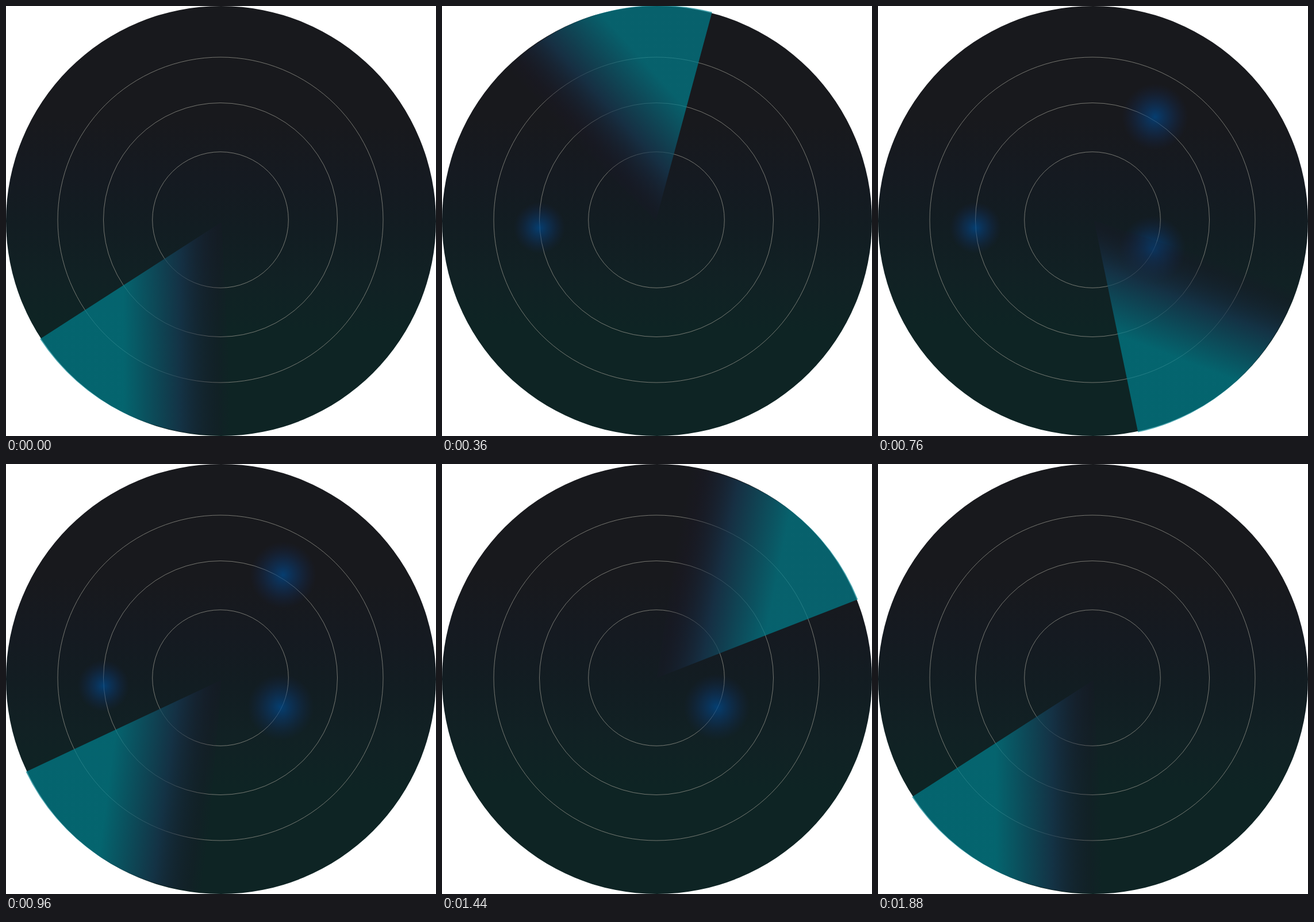
Recreate the animation shown at these times as an HTML page. Size 748 px wide and 748 px high, loop 1.92 s.

```html
<!DOCTYPE html>
<html lang="en">
<head>
<meta charset="utf-8">
<title>Radar sweep</title>
<style>
  html, body { margin: 0; width: 100%; height: 100%; overflow: hidden; background: #fff; }
  svg { display: block; width: 100vw; height: 100vh; }
</style>
</head>
<body>
<svg viewBox="0 0 748 748">
  <defs>
    <linearGradient id="dish" gradientUnits="userSpaceOnUse" x1="374" y1="0" x2="359" y2="748">
      <stop offset=".27" stop-color="#18191d"/>
      <stop offset=".4" stop-color="#151a21"/>
      <stop offset=".52" stop-color="#121d22"/>
      <stop offset=".63" stop-color="#112124"/>
      <stop offset=".75" stop-color="#0e2424"/>
    </linearGradient>
    <!-- Runs 33 degrees ahead of the leading edge -->
    <linearGradient id="beam" gradientUnits="userSpaceOnUse" x1="-15" y1="0" x2="170" y2="0" gradientTransform="rotate(33)">
      <stop offset="0" stop-color="#1a182a" stop-opacity="0"/>
      <stop offset=".11" stop-color="#1a182a" stop-opacity=".25"/>
      <stop offset=".46" stop-color="#163852" stop-opacity=".7"/>
      <stop offset="1" stop-color="#00808e" stop-opacity=".7"/>
    </linearGradient>
    <radialGradient id="glow">
      <stop offset="0" stop-color="#004a8c" stop-opacity=".75"/>
      <stop offset=".5" stop-color="#0a3c78" stop-opacity=".38"/>
      <stop offset="1" stop-color="#14285a" stop-opacity="0"/>
    </radialGradient>
  </defs>
  <circle cx="374" cy="374" r="374" fill="url(#dish)"/>
  <g id="rings" fill="none" stroke="#8f8e86" stroke-width=".8"></g>
  <g id="blips" fill="url(#glow)"></g>
  <path id="sweep" fill="url(#beam)"/>
</svg>
<script>
const LOOP = 1920, STEP = 40, STEPS = LOOP / STEP;
const START_ANGLE = 146.9, TURNS = 2;
const CENTER = 374;

const byId = id => document.getElementById(id);
const clamp = v => Math.max(0, Math.min(1, v));

function addCircle(parent, cx, cy, r) {
  const circle = document.createElementNS("http://www.w3.org/2000/svg", "circle");
  Object.entries({ cx, cy, r }).forEach(([name, value]) => circle.setAttribute(name, value));
  return parent.appendChild(circle);
}

[118.3, 203.5, 283].forEach(r => addCircle(byId("rings"), 373, 372, r));

// Each blip lights up on the first pass of the beam and goes out on the second.
const blips = [
  { x: 169.5, y: 386, r: 45, on: 80, off: 1000 },
  { x: 482, y: 193, r: 58, on: 400, off: 1340 },
  { x: 478, y: 423, r: 58, on: 620, off: 1540 }
].map(b => ({ ...b, node: addCircle(byId("blips"), b.x, b.y, b.r) }));

const sweep = byId("sweep");
const tail = -Math.PI / 3;
sweep.setAttribute("d",
  `M0 -2 L375.8 0 A372 372 0 0 0 ${372 * Math.cos(tail)} ${372 * Math.sin(tail)} Z`);

function render(ms) {
  const step = Math.floor((ms % LOOP) / STEP);
  const time = step * STEP;
  // The last step rests on the opening pose.
  const angle = START_ANGLE + 360 * TURNS * step / (STEPS - 1);
  sweep.setAttribute("transform", `translate(${CENTER} ${CENTER}) rotate(${angle})`);
  for (const { node, on, off } of blips) {
    node.setAttribute("opacity", clamp((time - on) / 120) * clamp(1 - (time - off) / 80));
  }
}

const origin = performance.now();
function tick() {
  render(performance.now() - origin);
  requestAnimationFrame(tick);
}
tick();
</script>
</body>
</html>
```
